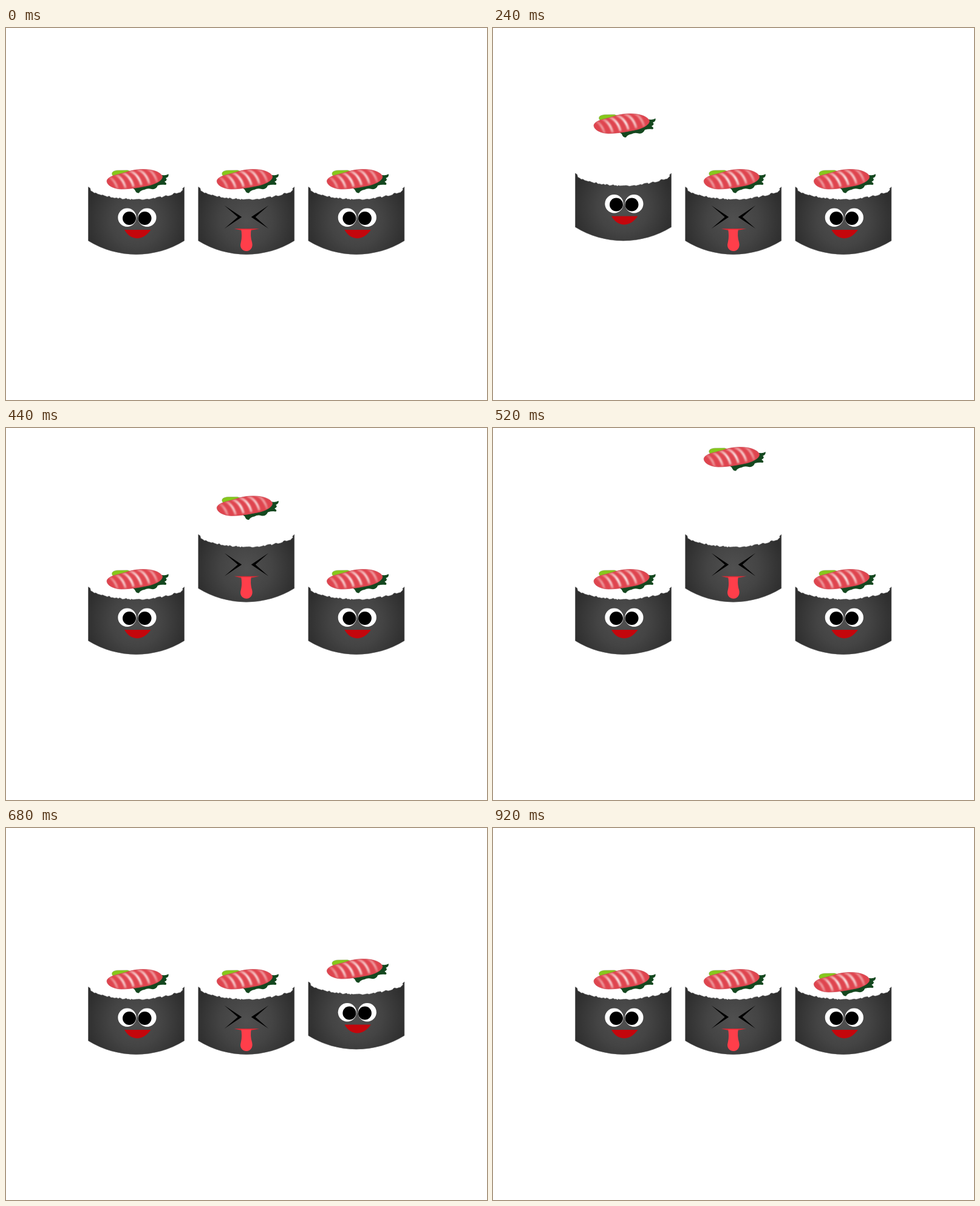
An HTML page for the animation above (960 ms loop, 792x612 px).

```html
<!DOCTYPE html>
<html lang="en">
<head>
<meta charset="utf-8">
<title>Hopping sushi</title>
<style>
  html, body { margin: 0; width: 100%; height: 100%; overflow: hidden; background: #fff; }
  svg { display: block; width: 792px; height: 612px; }
</style>
</head>
<body>
<svg viewBox="0 0 792 612">
  <defs>
    <radialGradient id="nori" gradientUnits="userSpaceOnUse" cx="214.5" cy="317" r="84">
      <stop offset="0" stop-color="#505050"/>
      <stop offset=".5" stop-color="#444"/>
      <stop offset="1" stop-color="#2e2e2e"/>
    </radialGradient>
    <radialGradient id="shine" gradientUnits="userSpaceOnUse" cx="212" cy="248.500" r="48" gradientTransform="matrix(1 -.12 0 .38 0 179.500)">
      <stop offset="0" stop-color="#fff" stop-opacity=".95"/>
      <stop offset=".55" stop-color="#fbe4e2" stop-opacity=".75"/>
      <stop offset="1" stop-color="#f0a0a4" stop-opacity=".3"/>
    </radialGradient>
    <filter id="soft" filterUnits="userSpaceOnUse" x="155" y="220" width="115" height="60"><feGaussianBlur stdDeviation="1"/></filter>
    <path id="fillet" d="M166 251.500C167 246.500 174 243.500 182 241.500C196 238.500 205 233.500 220 232.700C240 231.500 254 236.500 257.500 244C258 250.500 248 255.500 238 258.500C224 261.500 206 265 190 265C176 264.500 166 258.500 166 251.500Z"/>
    <clipPath id="cut"><use href="#fillet"/></clipPath>

    <path id="roll" fill="url(#nori)" stroke="#555" stroke-width=".6"/>

    <g id="happy">
      <g fill="#fff"><circle cx="199.500" cy="311.700" r="15.200"/><circle cx="232.300" cy="311.700" r="15.200"/></g>
      <g fill="#000"><circle cx="203" cy="313" r="11"/><circle cx="228.500" cy="313" r="11"/></g>
      <path fill="#c4060c" d="M195 332H238.500C232 341 224 346 216 346C208 346 200 341 195 332Z"/>
    </g>

    <g id="silly">
      <path d="M178.500 292L207 311L178.500 330L200.500 311ZM251 292L222.500 311L251 330L229.500 311Z"/>
      <path fill="#d62c36" d="M194.500 330H236L228 331.800L222 333H206Z"/>
      <path fill="#ff3e4a" d="M206 331.500H222.500C221.500 338 221.500 345 224 353C226 361 221 367 215 367C208 367 203 361 205.500 353C207.500 345 207 338 206 331.500Z"/>
    </g>

    <g id="topping">
      <path fill="#86c81c" stroke="#789a48" stroke-width=".5" d="M175 241.500C173 237 178 234.500 184 234.200L200 234L207 236.500L192 243L177 244Z"/>
      <path fill="#14481f" d="M207 262L250 243L258 242Q263 243 267.500 240.300Q268.500 245 263 247Q267 250 261 253Q266 256 263 258Q257 257 250 259Q247 266 240 265Q233 263 228 266Q221 267 219 271.500Q214 272 212 266Z"/>
      <use href="#fillet" fill="#df454f"/>
      <g clip-path="url(#cut)">
        <g id="stripes" fill="none" stroke="url(#shine)" stroke-width="3.800" filter="url(#soft)"/>
      </g>
      <use href="#fillet" fill="none" stroke="#c9454f" stroke-width=".7"/>
    </g>
  </defs>
  <g id="stage"></g>
</svg>
<script>
const $ = id => document.getElementById(id);
const NS = 'http://www.w3.org/2000/svg';
const LOOP = 960, STEP = 40, GAP = 181.2;

function add(parent, tag, attrs) {
  const el = parent.appendChild(document.createElementNS(NS, tag));
  for (const k in attrs) el.setAttribute(k, attrs[k]);
  return el;
}

// Seaweed sheet with a ragged upper edge
let seed = 7;
const rand = () => (seed = seed * 16807 % 2147483647) / 2147483647;
let d = 'M135.5 261.5L138.500 263.500';
for (let x = 139.5; x < 291; x += 1.6 + rand() * 2.2) {
  const u = (x - 214.5) / 79;
  d += `L${x.toFixed(1)} ${(282 - 14.5 * u * u + (rand() - .5) * 2.4).toFixed(1)}`;
}
d += 'L291.5 266L290.500 264.500L293.500 261.500V350A150 150 0 0 1 135.500 350Z';
$('roll').setAttribute('d', d);

for (let i = 0; i < 6; i++) {
  const x = 164 + i * 13, y = 242 - i * 2.4;
  add($('stripes'), 'path', { d: `M${x} ${y}q15 5 20 24` });
}

// Vertical offsets as [time, dy], linear in between
const pieces = [
  { face: 'happy',
    body: [[0, 0], [160, -45], [320, 0]],
    top: [[0, 0], [200, -122], [360, 0]] },
  { face: 'silly',
    body: [[320, 0], [480, -115], [640, 0]],
    top: [[0, 0], [80, -3], [200, 0], [320, 0], [520, -201], [680, 0]] },
  { face: 'happy',
    body: [[640, 0], [800, -34], [920, 0]],
    top: [[640, 0], [840, -85], [920, 5], [960, 0]] }
];

function offset(keys, t) {
  for (let i = 1; i < keys.length; i++) {
    const [t0, y0] = keys[i - 1], [t1, y1] = keys[i];
    if (t >= t0 && t <= t1) return y0 + (y1 - y0) * (t - t0) / (t1 - t0);
  }
  return 0;
}

pieces.forEach((p, i) => {
  const g = add($('stage'), 'g', { transform: `translate(${i * GAP} 0)` });
  p.bodyEl = add(g, 'g');
  add(p.bodyEl, 'use', { href: '#roll' });
  add(p.bodyEl, 'use', { href: '#' + p.face });
  p.topEl = add(g, 'use', { href: '#topping' });
});

function draw(now) {
  const t = Math.floor(now % LOOP / STEP) * STEP;
  for (const p of pieces) {
    p.bodyEl.setAttribute('transform', `translate(0 ${offset(p.body, t)})`);
    p.topEl.setAttribute('transform', `translate(0 ${offset(p.top, t)})`);
  }
}

let start;
function tick(now) {
  start ??= now;
  draw(now - start);
  requestAnimationFrame(tick);
}
draw(0);
requestAnimationFrame(tick);
</script>
</body>
</html>
```
